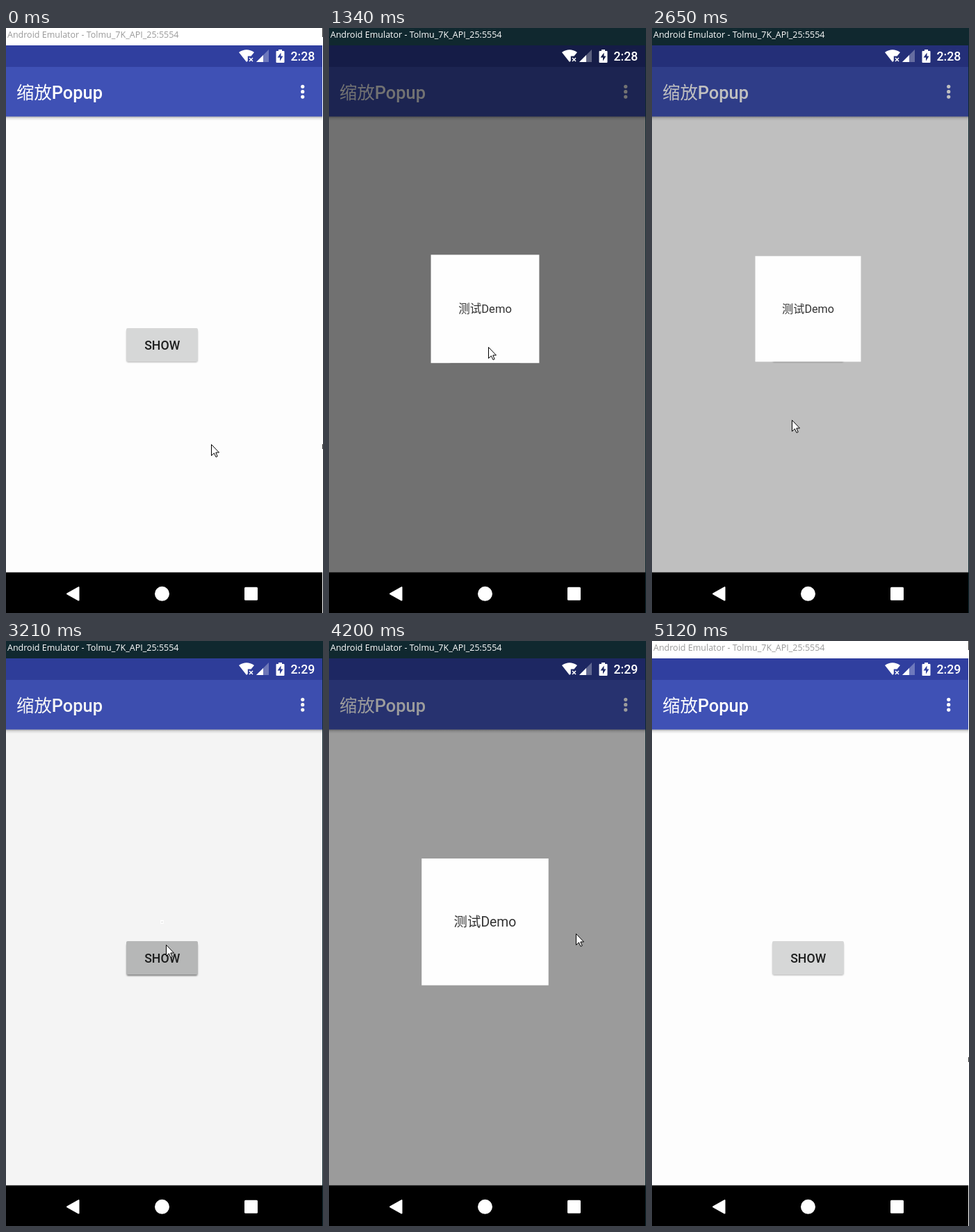
These frames come from a looping animation (456x842 px, 5.17 s). An HTML page:

```html
<!DOCTYPE html>
<html lang="en">
<head>
<meta charset="utf-8">
<title>Scaling popup</title>
<style>
  html, body { margin: 0; width: 100%; height: 100%; overflow: hidden; background: #fff; }
  svg { display: block; width: 456px; height: 842px; }
  text { font-family: Roboto, "Noto Sans CJK SC", "Noto Sans CJK", sans-serif; }
  .medium { font-weight: 500; }
  .cjk { font-family: "Noto Sans CJK SC", "Noto Sans CJK", sans-serif; font-weight: 400; }
  #title { font: 12.5px "Open Sans", "Noto Sans", sans-serif; }
</style>
</head>
<body>
<svg viewBox="0 0 456 842" xmlns="http://www.w3.org/2000/svg">
  <defs>
    <linearGradient id="fall" x1="0" y1="0" x2="0" y2="1">
      <stop offset="0" stop-color="#000" stop-opacity=".3"/>
      <stop offset=".4" stop-color="#000" stop-opacity=".1"/>
      <stop offset="1" stop-color="#000" stop-opacity="0"/>
    </linearGradient>
    <filter id="blur" x="-10%" y="-20%" width="120%" height="140%">
      <feGaussianBlur stdDeviation="1.3"/>
    </filter>
  </defs>

  <!-- emulator window -->
  <rect id="frame" width="456" height="842"/>
  <g id="marks" fill="#333">
    <rect x="455" width="1" height="13"/>
    <rect x="455" y="599" width="1" height="7"/>
  </g>
  <text id="title" x="2" y="14">Android Emulator - Tolmu_7K_API_25:5554</text>

  <!-- activity -->
  <rect y="127" width="455" height="657" fill="#fdfdfd"/>
  <rect y="25" width="455" height="31" fill="#303f9f"/>
  <rect y="56" width="455" height="71.5" fill="#3f51b5"/>
  <rect y="127.500" width="455" height="6" fill="url(#fall)"/>
  <text class="medium" x="15" y="102" font-size="25.4" fill="#fff"><tspan class="cjk">缩放</tspan>Popup</text>
  <g fill="#fff">
    <circle cx="426.700" cy="84.300" r="2.600"/>
    <circle cx="426.700" cy="91.700" r="2.600"/>
    <circle cx="426.700" cy="99.100" r="2.600"/>
  </g>
  <rect id="shade" x="173.500" width="102" height="46.500" rx="2" filter="url(#blur)"/>
  <rect x="173" y="432" width="103" height="48" rx="2" fill="#d6d7d7"/>
  <rect id="press" x="173" y="432" width="103" height="48" rx="2"/>
  <text class="medium" x="224.700" y="462.500" font-size="17.700" text-anchor="middle" fill="#1d1e1e">SHOW</text>

  <rect id="dim" y="25" width="455" height="759"/>

  <g id="popup">
    <rect x="-96" y="-96" width="192" height="192" fill="#fefefe"/>
    <text y="7.500" font-size="20.400" text-anchor="middle" fill="#333"><tspan class="cjk">测试</tspan>Demo</text>
  </g>

  <!-- status icons -->
  <g fill="#fff">
    <path d="M335 35Q346 27.500 357 35L352.500 40.500H347.800V47.200L346 49Z"/>
    <path d="M350 43l5 5m0-5l-5 5" stroke="#fff" stroke-width="1.500"/>
    <path d="M360 49L378 31V49Z" opacity=".3"/>
    <path d="M360 49L370 39V49Z"/>
    <path fill-rule="evenodd" d="M392 31h5v2h2.500q1 0 1 1v15q0 1-1 1h-10q-1 0-1-1v-15q0-1 1-1h2.500ZM395.500 35.500L390.500 42.500H394V47.500L398.500 40.500H395.500Z"/>
    <text id="clock" class="medium" x="409.500" y="47.300" font-size="17.700"></text>
  </g>

  <!-- navigation bar -->
  <rect y="783.500" width="455" height="58.500"/>
  <g fill="#fff">
    <path d="M88 814.300L104.500 805V823.600Z" stroke="#fff" stroke-width="2" stroke-linejoin="round"/>
    <circle cx="224.500" cy="814.300" r="10.500"/>
    <rect x="343" y="804.800" width="19" height="19" rx="1.500"/>
  </g>

  <path id="cursor" d="M.5 .5V16.500L4.400 12.900L7 18.500L9.200 17.500L6.800 12H11.500Z" fill="#fff" stroke="#000"/>
</svg>
<script>
const LOOP = 5170;
const FULL_DIM = 0.553;
const el = id => document.getElementById(id);
const set = (id, attrs) => {
  for (const k in attrs) el(id).setAttribute(k, attrs[k]);
};
const clamp = v => Math.min(1, Math.max(0, v));
const ramp = (t, start, length) => clamp((t - start) / length);
const smooth = u => (1 - Math.cos(Math.PI * u)) / 2;

// each showing of the popup: press, grow, first sight of closing
const shows = [
  { press: 910, open: 1116, close: 2570 },
  { press: 2980, open: 3178, close: 4170 }
];

// pointer tip: time, x, y
const path = [
  [310, 295, 599], [760, 229, 459],
  [1520, 229, 459], [1730, 215, 537],
  [1980, 215, 537], [2150, 219, 431], [2360, 201, 564],
  [2640, 201, 564], [2960, 230, 437],
  [3210, 230, 437], [3440, 242, 395], [3690, 298, 400],
  [3720, 298, 400], [3950, 362, 411],
  [4150, 362, 411], [4200, 355, 421], [4650, 345, 845]
];

function pointer(t) {
  const i = path.findIndex(p => p[0] > t);
  if (i === 0) return path[0].slice(1);
  if (i < 0) return path[path.length - 1].slice(1);
  const [a, b] = [path[i - 1], path[i]];
  const u = smooth((t - a[0]) / (b[0] - a[0]));
  return [a[1] + (b[1] - a[1]) * u, a[2] + (b[2] - a[2]) * u];
}

function popupState(t) {
  const s = t < shows[1].press ? shows[0] : shows[1];
  const closing = t >= s.close;
  let scale = smooth(ramp(t, s.open, 315));
  let dim = ramp(t, s.open + 20, 200);
  if (closing) {
    scale = 1 - smooth(ramp(t, s.close - 14, 315));
    dim = 1 - ramp(t, s.close - 29, 200);
  }
  const press = t > s.open + 400 ? 0 : ramp(t, s.press, 150);
  return { scale, dim, press };
}

function draw(t) {
  const active = t >= 910 && t < 5120;
  set("frame", { fill: active ? "#10282f" : "#fff" });
  set("marks", { opacity: active ? 0 : 1 });
  set("title", { fill: active ? "#fff" : "#999" });
  el("clock").textContent = t < 2900 ? "2:28" : "2:29";

  const { scale, dim, press } = popupState(t);
  set("dim", { opacity: dim * FULL_DIM });
  set("press", { opacity: press * 0.117 });
  set("shade", { y: 434.5 + press, opacity: 0.3 + press * 0.15 });
  set("popup", {
    transform: `translate(224.5 404.3) scale(${scale})`,
    visibility: scale > 0.001 ? "visible" : "hidden"
  });

  const [x, y] = pointer(t).map(Math.round);
  set("cursor", { transform: `translate(${x} ${y})` });
}

const start = performance.now();
function tick() {
  draw((performance.now() - start) % LOOP);
  requestAnimationFrame(tick);
}
tick();
</script>
</body>
</html>
```
